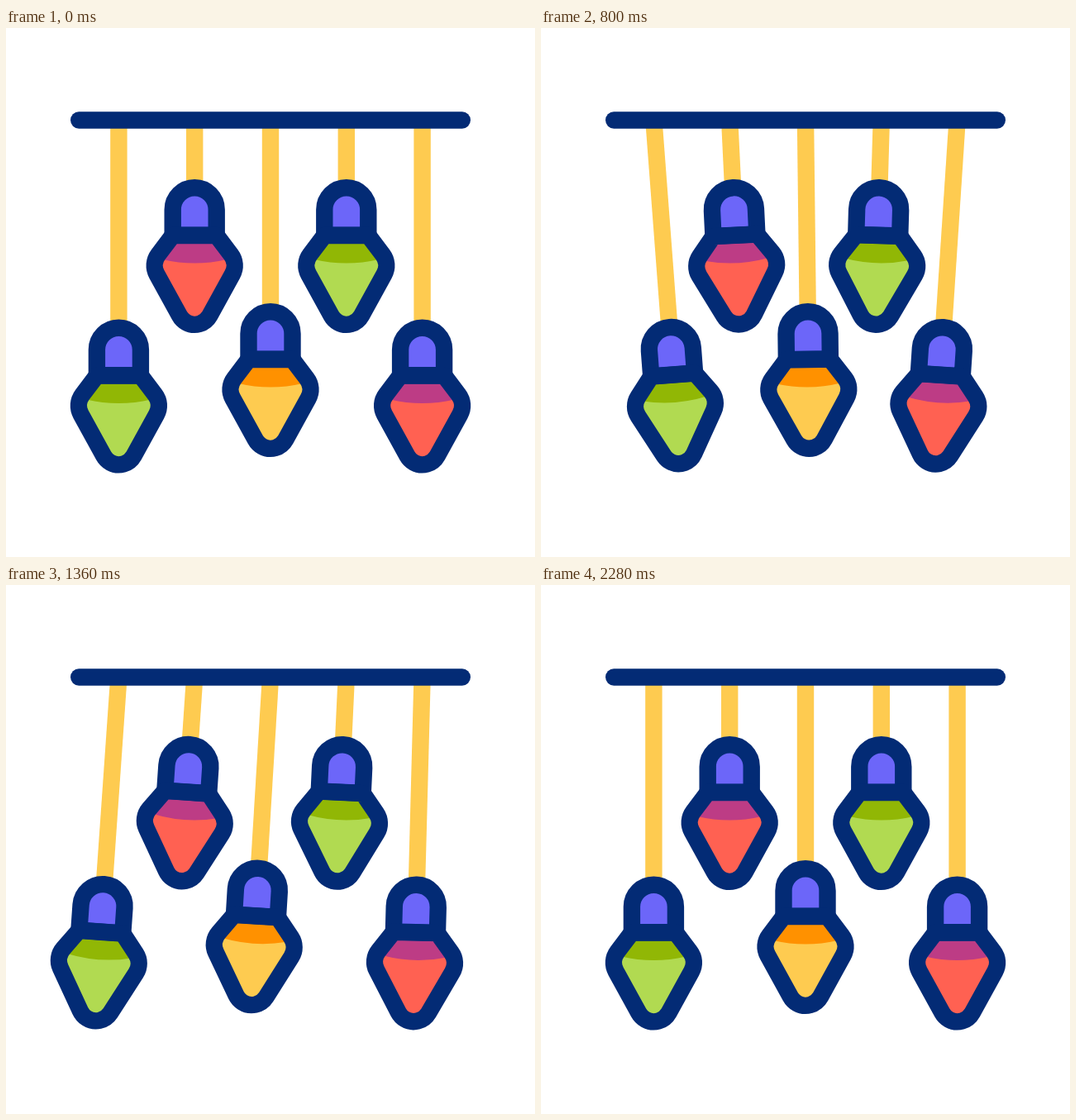
Animation, 640 px wide and 640 px high, one loop 2.32 s. Source, as an HTML page with a canvas:

```html
<!DOCTYPE html>
<html lang="en">
<head>
<meta charset="utf-8">
<title>Swinging lights</title>
<style>
  html, body { margin: 0; width: 100%; height: 100%; overflow: hidden; background: #fff; }
  canvas { display: block; width: 640px; height: 640px; }
</style>
</head>
<body>
<canvas id="stage"></canvas>
<script>
const LOOP = 2320, STEP = 40, LAG = 40;
const BAR_Y = 111.5, LINE = 20.4;
const NAVY = '#032b75', CORD = '#fecb50', CAP = '#6c66f9';
const RED = ['#ff6152', '#bd3c85'];
const GREEN = ['#b1da51', '#91b705'];
const GOLD = ['#fecb50', '#ff9100'];

// x, vertical drop, [light, dark]; each lamp lags the one to its left
const lamps = [
  [136.4, 169.5, GREEN],
  [228.2, 0, RED],
  [320, 150, GOLD],
  [411.8, 0, GREEN],
  [503.6, 169.5, RED]
];

// time in ms, swing in degrees (positive = right)
const keys = [[80, 0], [480, -7], [920, 6], [1360, -4], [1760, 2], [2090, 0]];

const canvas = document.getElementById('stage');
const ctx = canvas.getContext('2d');
const dpr = window.devicePixelRatio || 1;
canvas.width = canvas.height = Math.round(640 * dpr);

// cubic-bezier(.5, 0, .5, 1)
function ease(u) {
  let lo = 0, hi = 1;
  for (let i = 0; i < 24; i++) {
    const s = (lo + hi) / 2;
    if (1.5 * s * (1 - s) + s * s * s < u) lo = s; else hi = s;
  }
  return lo * lo * (3 - 2 * lo);
}

function swing(t) {
  if (t <= keys[0][0]) return 0;
  for (let i = 1; i < keys.length; i++) {
    const [t0, a] = keys[i - 1], [t1, b] = keys[i];
    if (t < t1) return a + (b - a) * ease((t - t0) / (t1 - t0));
  }
  return 0;
}

const cap = new Path2D();
cap.moveTo(-26.5, 250.8);
cap.lineTo(-26.5, 219.8);
cap.arc(0, 219.8, 26.5, Math.PI, 0);
cap.lineTo(26.5, 250.8);
cap.closePath();

const bulb = new Path2D();
bulb.moveTo(0, 251);
bulb.lineTo(26.5, 251);
bulb.arcTo(52.6, 285.5, 18.2, 348, 22);
bulb.arc(0, 338, 20.8, 0.503, Math.PI - 0.503);
bulb.arcTo(-52.6, 285.5, -26.5, 251, 22);
bulb.lineTo(-26.5, 251);
bulb.closePath();

const shade = new Path2D();
shade.moveTo(-60, 245);
shade.lineTo(60, 245);
shade.lineTo(60, 273);
shade.lineTo(39, 280);
shade.quadraticCurveTo(0, 289, -39, 280);
shade.lineTo(-60, 273);
shade.closePath();

function fill(path, color) {
  ctx.fillStyle = color;
  ctx.fill(path);
}

function drawLamp(x, drop, [light, dark], angle) {
  ctx.save();
  ctx.translate(x, BAR_Y);
  ctx.rotate(-angle * Math.PI / 180);
  ctx.translate(0, -BAR_Y);
  ctx.fillStyle = CORD;
  ctx.fillRect(-LINE / 2, BAR_Y, LINE, 82 + drop);

  ctx.translate(0, drop);
  fill(cap, CAP);
  fill(bulb, light);
  ctx.save();
  ctx.clip(bulb);
  fill(shade, dark);
  ctx.restore();
  ctx.stroke(cap);
  ctx.stroke(bulb);
  ctx.restore();
}

function draw(t) {
  ctx.setTransform(dpr, 0, 0, dpr, 0, 0);
  ctx.fillStyle = '#fff';
  ctx.fillRect(0, 0, 640, 640);
  ctx.strokeStyle = NAVY;
  ctx.lineWidth = LINE;
  ctx.lineJoin = ctx.lineCap = 'round';
  lamps.forEach(([x, drop, tone], i) => drawLamp(x, drop, tone, swing(t - i * LAG)));
  ctx.beginPath();
  ctx.moveTo(88.2, BAR_Y);
  ctx.lineTo(551.8, BAR_Y);
  ctx.stroke();
}

const start = performance.now();
function tick() {
  const t = (performance.now() - start) % LOOP;
  draw(Math.floor(t / STEP) * STEP);
  requestAnimationFrame(tick);
}
tick();
</script>
</body>
</html>
```
